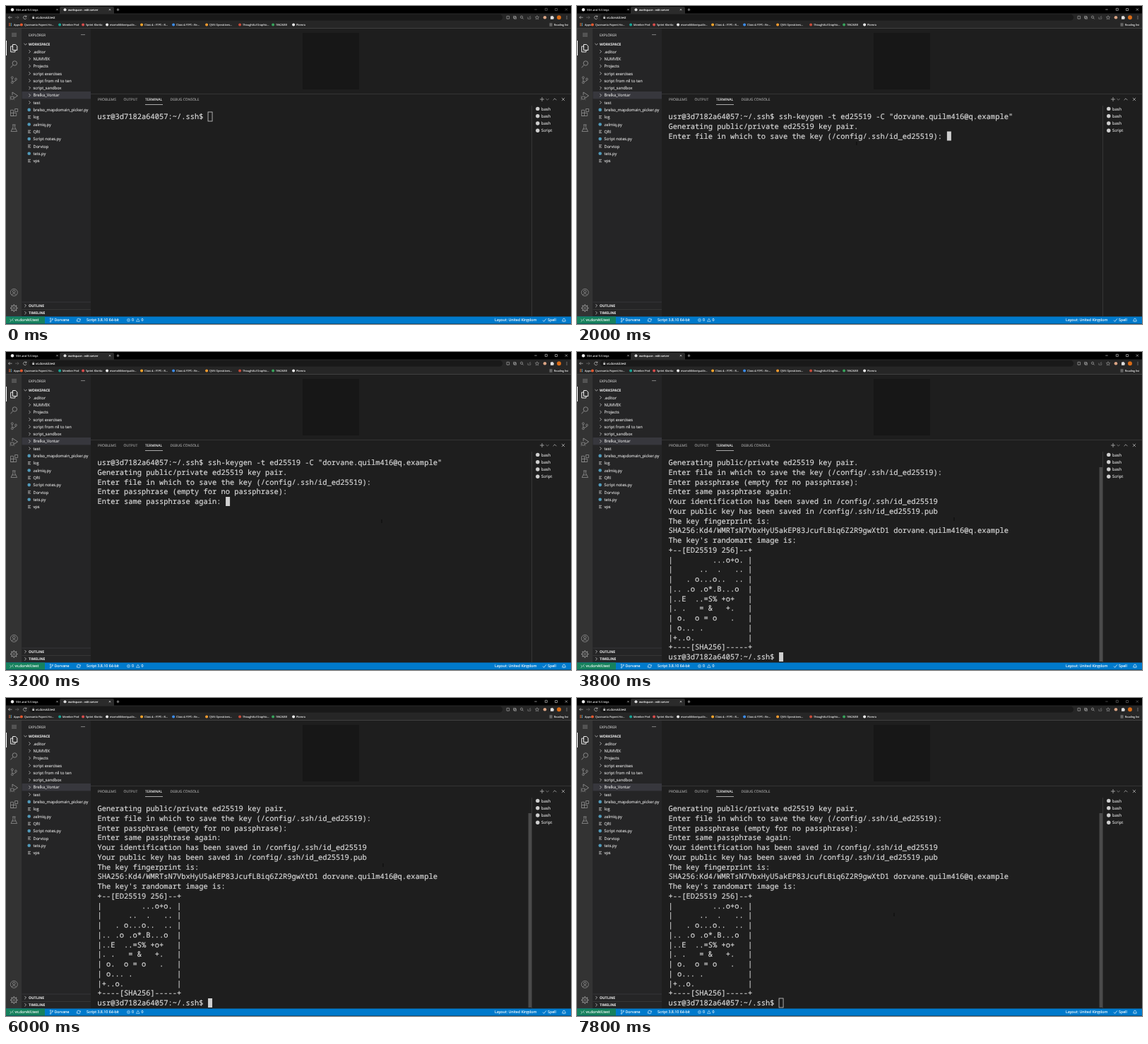
Recreate the animation shown at these times as an HTML page. Size 800 by 450 pixels, loop 8000 ms.

```html
<!DOCTYPE html>
<html lang="en">
<head>
<meta charset="utf-8">
<title>Terminal session</title>
<style>
html, body { margin: 0; width: 100%; height: 100%; overflow: hidden; background: #1e1e1e; }
svg { display: block; width: 100vw; height: 100vh; }
text { font-family: "Open Sans", "Noto Sans", sans-serif; white-space: pre; text-rendering: geometricPrecision; stroke-width: 0.12px; }
#term text { font-family: "Noto Sans Mono", monospace; font-size: 10.43px; fill: #dadada; stroke: #dadada; stroke-width: 0.16px; }
</style>
</head>
<body>
<svg viewBox="0 0 800 450" xmlns="http://www.w3.org/2000/svg">
  <g id="ui"></g>
  <path id="controls" d="M748.3 5h3.4M763.3 3.3h3v3h-3zM777.5 3.5h3v3h-3zM791.8 3.4l3.2 3.2m0-3.2l-3.2 3.2" fill="none" stroke-width="0.6"/>
  <g id="term"></g>
  <rect id="slider" x="739.6" y="163" width="4.4" height="275"/>
  <rect id="cursor" width="6" height="13" stroke-width="0.8"/>
  <rect id="mouse" width="0.9" height="5" fill="#080808"/>
</svg>
<script>
const $ = id => document.getElementById(id);
const LOOP = 8000;
const INK = '#dcdcdc';

// ---- drawing helpers ----
const parts = [];
const esc = s => s.replace(/&/g, '&amp;').replace(/</g, '&lt;');
const rect = (x, y, w, h, fill) =>
  parts.push(`<rect x="${x}" y="${y}" width="${w}" height="${h}" fill="${fill}"/>`);
const dot = (x, y, r, fill) => parts.push(`<circle cx="${x}" cy="${y}" r="${r}" fill="${fill}"/>`);
const line = (d, stroke = '#c5c5c5', w = 0.7) =>
  parts.push(`<path d="${d}" fill="none" stroke="${stroke}" stroke-width="${w}"/>`);
const ring = (x, y, r, stroke, w) =>
  parts.push(`<circle cx="${x}" cy="${y}" r="${r}" fill="none" stroke="${stroke}" stroke-width="${w}"/>`);
const label = (x, y, s, size, fill = INK, weight = 400) =>
  parts.push(`<text x="${x}" y="${y}" font-size="${size}" fill="${fill}" stroke="${fill}" font-weight="${weight}">${esc(s)}</text>`);
const right = (x, y, c, w) => line(`M${x - 1.1} ${y - 2.1}l2.1 2.1l-2.1 2.1`, c, w);
const down = (x, y, c, w) => line(`M${x - 2.1} ${y - 1}l2.1 2.1l2.1 -2.1`, c, w);
const cross = (x, y, r, c, w) => line(`M${x - r} ${y - r}l${2 * r} ${2 * r}m0 ${-2 * r}l${-2 * r} ${2 * r}`, c, w);

function browser() {
  rect(0, 0, 800, 11, '#000');
  rect(0, 10.5, 800, 21, '#262626');
  rect(0, 31, 800, 1, '#404040');
  parts.push('<path d="M76 11V3q0-2 2-2h73q2 0 2 2v8z" fill="#2b2b2b"/>');
  dot(9, 5.2, 2.2, '#eee');
  label(14, 6.8, 'SSH and TLS keys', 3.9);
  dot(83.5, 5.2, 2, '#ddd');
  label(88, 6.8, 'workspace - edit-server', 3.9, '#f2f2f2');
  cross(72.5, 5.2, 1.2, '#ccc', 0.6);
  cross(147, 5.2, 1.2, '#eee', 0.6);
  line('M156.5 5.2h4m-2-2v4', '#ddd', 0.6);

  parts.push('<rect x="33" y="11.8" width="670" height="8.8" rx="4.4" fill="#191919"/>');
  line('M8.5 16.2h-5m2-2l-2 2l2 2', '#ddd', 0.6);
  line('M13 16.2h5m-2-2l2 2l-2 2', '#777', 0.6);
  line('M28.8 15a2.3 2.3 0 1 0 .2 2.2m-.1-3.7v1.8h-1.8', '#ddd', 0.6);
  rect(37.3, 15.6, 2.8, 2.4, '#ccc');
  line('M37.8 15.7v-.8q.9-1.4 1.8 0v.8', '#ccc', 0.5);
  label(42, 17.9, 'vs.dorvkil.test', 4.3, '#f2f2f2');
  line('M709 14.3h3.6v3.8h-3.6z', '#bbb', 0.6);
  line('M718.5 14.3h3v3h-3zm1 1h3v3h-3z', '#bbb', 0.5);
  ring(730, 15.7, 1.6, '#bbb', 0.6);
  line('M731.2 17l1.5 1.5', '#bbb', 0.6);
  line('M738.8 15.5v2.7h4v-2.7m-2 1.2l1.8-2.8', '#888', 0.6);
  line('M752 13.7l.8 1.7l1.8.2l-1.4 1.3l.4 1.8l-1.6-.9l-1.6.9l.4-1.8l-1.4-1.3l1.8-.2z', '#bbb', 0.5);
  dot(763, 16.2, 2.3, '#d9a384');
  parts.push('<path d="M771 14.6h1.4a.8.8 0 0 1 1.6 0h1.3v1.3a.8.8 0 0 1 0 1.6v1.2H771z" fill="#ddd"/>');
  dot(783, 16.2, 3, '#d96b16');
  [-1.8, 0, 1.8].forEach(d => dot(794, 16.2 + d, 0.5, '#ccc'));

  for (let i = 0; i < 9; i++)
    rect(4 + i % 3 * 1.5, 24.2 + Math.floor(i / 3) * 1.5, 1, 1, ['#e5503d', '#f0b33c', '#4a9ce8'][i % 3]);
  label(11, 28, 'Apps', 3.8);
  const marks = [
    [25.8, '#e4572e', 'Quorvanta Papers Ho...'], [80, '#16a394', 'Member Pod'],
    [113, '#d84c4c', 'Sprint Klorda'], [147, '#eee', 'marnoltibberquaile...'],
    [196, '#f3a32b', 'Class 4 - FTPS - R...'], [241, '#3b8ceb', 'Class 4 FTPS - Re...'],
    [288, '#f29a2e', 'QVN Operations...'], [335, '#c74b3a', 'Thoughtful Graphic...'],
    [382, '#37a35b', 'TRK268B'], [411, '#eee', 'Plomra']];
  for (const [x, color, name] of marks) {
    dot(x - 3.9, 26.4, 2, color);
    label(x, 28, name, 3.85);
  }
  line('M769.5 24.8h4m-4 1.6h4m-4 1.6h4', '#ccc', 0.6);
  label(776, 28, 'Reading list', 3.75);
}

function activityBar() {
  const c = '#909090';
  rect(0, 32, 22.5, 408, '#333');
  line('M8 38.8h7m-7 2h7m-7 2h7', c, 0.7);
  rect(0, 49, 1, 21, '#fff');
  line('M9.5 54.5h4l2.3 2.3v5.7h-6.3zM9.5 57h-2.8v8h6.2v-2.4', '#fff', 0.9);
  ring(12.3, 81, 3.2, c, 0.9);
  line('M10 83.4l-3.6 4', c, 0.9);
  ring(8.8, 101.3, 1.4, c, 0.8);
  ring(8.8, 108.3, 1.4, c, 0.8);
  ring(14, 103.5, 1.4, c, 0.8);
  line('M8.8 102.8v4m5.2-1.8q0 2-5 2.2', c, 0.8);
  line('M9 126v-4l7.5 5l-5 3.3', c, 0.9);
  ring(8.8, 130, 2.2, c, 0.8);
  line('M5.3 127.5l1.7 1m-2 1.7h1.6m-1.3 2.7l1.7-1m3.6-3.4l1.5-1m-1 2.7h1.5m-1.9 1.7l1.5 1', c, 0.6);
  line('M6.5 147.3h4v8.2h-4zm0 4.1h8.2v4.1h-8.2m6.1-10h4v4h-4z', c, 0.8);
  line('M9 168h4.6m-3.6 0v3.5l-3 6h8.6l-3-6v-3.5m-3.8 6h5', c, 0.8);
  ring(11.3, 405.3, 5, c, 0.8);
  ring(11.3, 404, 1.8, c, 0.8);
  line('M8 409q3.3-4.5 6.6 0', c, 0.8);
  ring(11.3, 427.5, 3.7, c, 1);
  ring(11.3, 427.5, 1.3, c, 0.8);
  for (let i = 0; i < 8; i++) {
    const a = i * Math.PI / 4, u = Math.cos(a), v = Math.sin(a);
    line(`M${11.3 + u * 3.8} ${427.5 + v * 3.8}l${u * 1.5} ${v * 1.5}`, c, 1.5);
  }
}

function sidebar() {
  rect(22.5, 32, 97.5, 408, '#252526');
  label(32, 42.6, 'EXPLORER', 5, '#c4c4c4');
  [-2, 0, 2].forEach(d => dot(109 + d, 40.6, 0.6, INK));
  down(27.5, 54, INK);
  label(32, 56, 'WORKSPACE', 5, INK, 700);
  rect(22.5, 121, 97.5, 10.4, '#37373d');
  // kind: d = folder, p = script, t = plain file
  const files = [
    'd.editor', 'dNUMVEK', 'dProjects', 'dscript exercises', 'dscript from nil to ten',
    'dscript_sandbox', 'dBrelka_Vontar', 'dtest', 'pbrelso_mapdomain_picker.py', 'tlog',
    'pzelmiq.py', 'tQRI', 'pScript notes.py', 'tDorvtop', 'ptets.py', 'tvps'];
  files.forEach((f, i) => {
    const y = 64.5 + i * 10.3;
    if (f[0] === 'd') right(33.5, y, INK);
    else if (f[0] === 'p') dot(32.7, y, 2.3, '#519aba');
    else line(`M31 ${y - 1.7}h4m-4 1.7h3m-3 1.7h4`, '#ccc', 0.75);
    label(38.5, y + 2.1, f.slice(1), 5.73);
  });
  [['OUTLINE', 424], ['TIMELINE', 434.3]].forEach(([name, y]) => {
    rect(22.5, y - 5.3, 97.5, 0.6, '#414142');
    right(27.5, y, INK);
    label(32, y + 1.9, name, 5, INK, 700);
  });
}

function panel() {
  rect(120, 32, 680, 408, '#1e1e1e');
  rect(420, 38, 80, 80, '#171717');
  rect(120, 124, 680, 0.6, '#454545');
  [['PROBLEMS', 130], ['OUTPUT', 166.5], ['TERMINAL', 197], ['DEBUG CONSOLE', 232.5]]
    .forEach(([name, x]) => label(x, 134.3, name, 5, x === 197 ? '#f0f0f0' : '#a2a2a2'));
  rect(197, 139, 25, 0.7, '#e7e7e7');
  line('M756 132h6m-3-3v6');
  down(766.5, 132, '#c5c5c5', 0.5);
  line('M774.6 133.2l2.4-2.4l2.4 2.4');
  cross(789, 132, 2.1, '#c5c5c5', 0.7);
  rect(744.2, 141, 0.6, 298, '#454545');
  ['bash', 'bash', 'bash', 'Script'].forEach((name, i) => {
    const y = 145.4 + i * 10.3;
    dot(752.8, y, 2.7, '#d0d0d0');
    label(758, y + 2.1, name, 5.73);
  });
}

function statusBar() {
  const w = '#fff', bar = (x, s) => label(x, 446.3, s, 5.3, w);
  rect(0, 439.5, 800, 10.5, '#007acc');
  rect(0, 439.5, 55, 10.5, '#16825d');
  rect(0, 449.4, 800, 0.6, '#0b3a5a');
  line('M5.5 443.2l2 1.8l-2 1.8m5-4.6l-2 1.8l2 1.8', w, 0.6);
  bar(12.5, 'vs.dorvkil.test');
  ring(63, 442.4, 0.8, w, 0.5);
  ring(63, 446.6, 0.8, w, 0.5);
  ring(66, 443, 0.8, w, 0.5);
  line('M63 443.2v2.6m3-2q0 1.3-2.8 1.5', w, 0.5);
  bar(68.5, 'Dorvane');
  line('M100.4 444a2.4 2.4 0 0 1 4.6-.2m.4-1.2v1.5h-1.5M105.2 445a2.4 2.4 0 0 1-4.6.2m-.4 1.2v-1.5h1.5', w, 0.6);
  bar(114, 'Script 3.8.10 64-bit');
  ring(173.5, 444.5, 2, w, 0.5);
  cross(173.5, 444.5, 0.8, w, 0.5);
  bar(178, '0');
  line('M186.8 442.3l2.3 4.1h-4.6z', w, 0.5);
  bar(191.5, '0');
  bar(692, 'Layout: United Kingdom');
  line('M760 444.7l1.6 1.7l3.4-4', w, 0.7);
  bar(767, 'Spell');
  line('M787.4 446q1-.8 1-2.2q.2-1.6 1.6-1.6t1.6 1.6q0 1.4 1 2.2zm2 .8h1.2', w, 0.6);
}

[browser, activityBar, sidebar, panel, statusBar].forEach(draw => draw());
$('ui').innerHTML = parts.join('');

// ---- terminal ----
const LEFT = 129.4, CELL = 6.258, TOP = 160.2, ROW = 13.75;
const mail = 'dorvane.quilm416@q.example';
const prompt = 'usr@3d7182a64057:~/.ssh$ ';
const command = `${prompt}ssh-keygen -t ed25519 -C "${mail}"`;
const key = '/config/.ssh/id_ed25519';
const intro = ['Generating public/private ed25519 key pair.', `Enter file in which to save the key (${key}): `];
const pass = 'Enter passphrase (empty for no passphrase): ';
const again = 'Enter same passphrase again: ';
const report = [
  `Your identification has been saved in ${key}`,
  `Your public key has been saved in ${key}.pub`,
  'The key fingerprint is:',
  `SHA256:Kd4/WMRTsN7VbxHyU5akEP83JcufLBiq6Z2R9gwXtD1 ${mail}`,
  "The key's randomart image is:",
  '+--[ED25519 256]--+',
  '|         ...o+o. |',
  '|      ..  .   .. |',
  '|   . o...o..  .. |',
  '|.. .o .o*.B...o  |',
  '|..E  ..=S% +o+   |',
  '|. .   = &   +.   |',
  '| o.  o = o   .   |',
  '| o... .          |',
  '|+..o.            |',
  '+----[SHA256]-----+',
  prompt];

const screens = [
  [0, [prompt]],
  [1300, [command.slice(0, -3)]],
  [1400, [command]],
  [2000, [command, ...intro]],
  [2900, [command, ...intro, pass]],
  [3200, [command, ...intro, pass, again]],
  [3800, [...intro, pass, again, ...report]]];

const pointer = [
  [0, -9, -9], [500, 593, 123], [600, -9, -9], [1300, 316, 170], [2000, 395.5, 192],
  [2900, 531.5, 237], [3800, 533.5, 234], [6300, 448.5, 304]];

const at = (steps, t) => steps.filter(s => s[0] <= t).pop();
let shown = null;

function render(t) {
  const screen = at(screens, t), lines = screen[1], last = lines.length - 1;
  if (screen !== shown) {
    shown = screen;
    $('term').innerHTML = lines.map((s, i) =>
      `<text x="${LEFT}" y="${TOP + i * ROW}">${esc(s)}</text>`).join('');
  }
  const focused = t >= 1300 && t < 6300, cur = $('cursor');
  cur.setAttribute('x', LEFT + lines[last].length * CELL + 0.2);
  cur.setAttribute('y', TOP + last * ROW - 10.2);
  cur.setAttribute('fill', focused ? '#d0d0d0' : 'none');
  cur.setAttribute('stroke', focused ? 'none' : '#d0d0d0');
  $('controls').setAttribute('stroke', focused ? '#ddd' : '#777');

  const [, x, y] = at(pointer, t);
  $('mouse').setAttribute('x', x);
  $('mouse').setAttribute('y', y);
  $('slider').setAttribute('fill', t < 3800 ? 'none' : t >= 6700 && t < 7000 ? '#515151' : '#4b4b4b');
}

const start = performance.now();
function tick() {
  render((performance.now() - start) % LOOP);
  requestAnimationFrame(tick);
}
tick();
</script>
</body>
</html>
```
